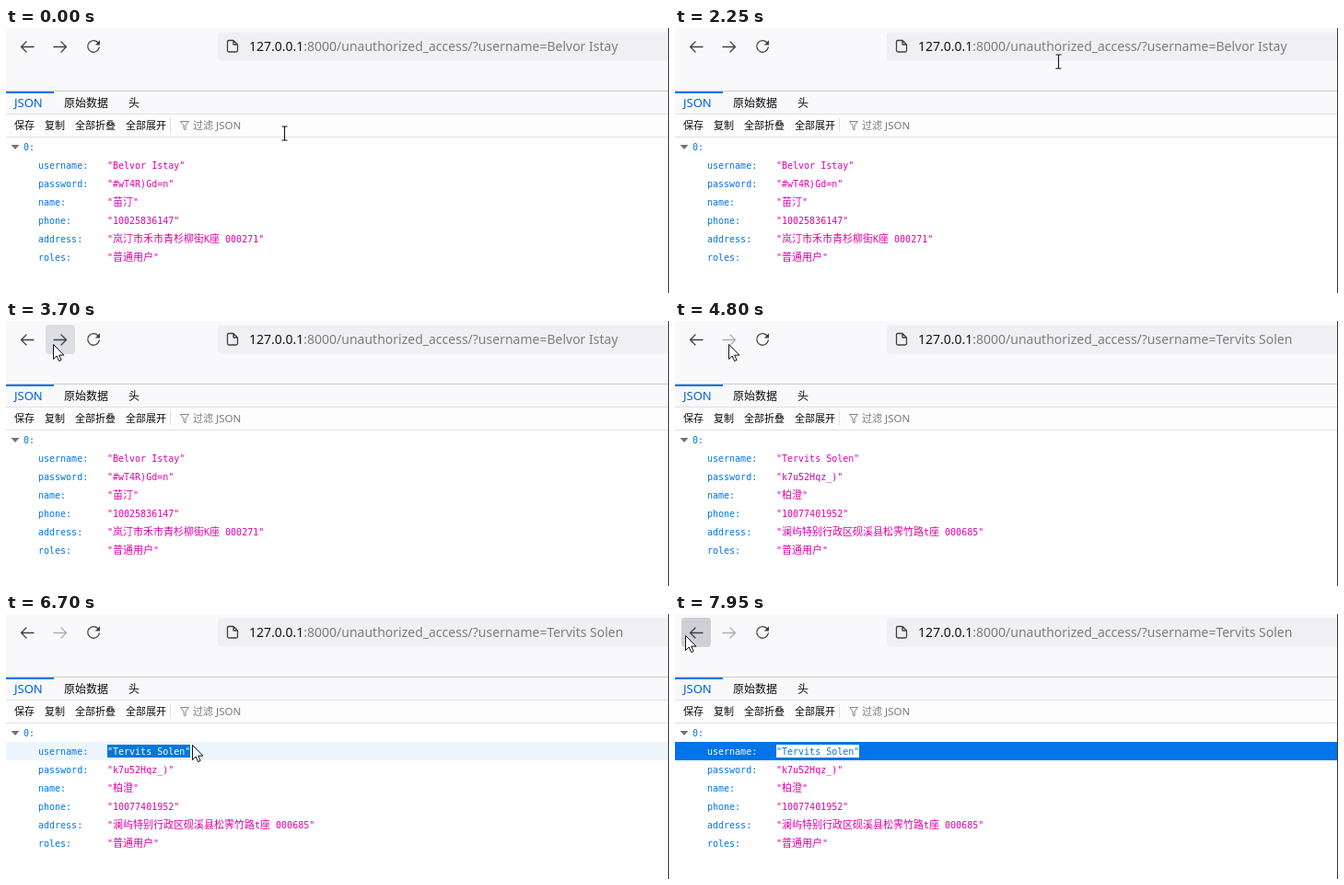
Animation of 720x288 px, one loop 8 s. Source, as an HTML page:

```html
<!DOCTYPE html>
<html lang="zh">
<head>
<meta charset="utf-8">
<title>JSON viewer</title>
<style>
html, body { margin: 0; width: 100%; height: 100%; overflow: hidden; background: #fff; }
svg { display: block; width: 100vw; height: 100vh; }
text { white-space: pre; }
.ui { font-family: "Noto Sans", "Noto Sans CJK SC", sans-serif; }
.url { font-size: 14px; fill: #7c7c82; }
.url .host { fill: #15141a; }
.url.picked, .url.picked .host { fill: #fff; }
.mono { font: 10px "DejaVu Sans Mono", "Noto Sans CJK SC", monospace; fill: #dd00a9; }
.mono .cjk { font-size: 11px; }
.key { fill: #0074e8; }
.tab { font-size: 13px; fill: #0c0c0d; }
.tab .cjk { font-size: 12px; }
.tool { font-size: 11.5px; fill: #0c0c0d; }
.tool .cjk { font-size: 11px; }
.icon { fill: none; stroke: #3f3f46; stroke-width: 1.3; stroke-linecap: round; stroke-linejoin: round; }
.hidden { display: none; }
</style>
</head>
<body>
<svg viewBox="0 0 720 288">
  <defs>
    <clipPath id="dragClip"><rect id="dragArea" x="110" y="142" width="0" height="14"/></clipPath>
  </defs>
  <rect width="720" height="288" fill="#fff"/>
  <rect width="720" height="68" fill="#f9f9fb"/>

  <rect id="backButton" x="7" y="4" width="32" height="32" rx="4"/>
  <rect id="forwardButton" x="43" y="4" width="32" height="32" rx="4"/>
  <path class="icon" d="M30 20.5H16.5M22 15l-5.5 5.5 5.5 5.5"/>
  <path class="icon" id="forwardIcon" d="M52 20.5h13.5M60 15l5.5 5.5-5.5 5.5"/>
  <path class="icon" d="M100.2 16.2A6.3 6.3 0 1 0 101.3 21"/>
  <path d="M102 13.3v5.2h-5.2z" fill="#3f3f46"/>

  <rect id="bar" x="230" y="4.5" width="500" height="31" rx="4" fill="#f0f0f4"/>
  <path class="icon" d="M247 13.5h-5q-1.500 0-1.500 1.500v9.500q0 1.500 1.500 1.500h8q1.500 0 1.500-1.500v-6.500zv4.500h4.500"/>
  <rect id="urlPick" x="264" y="11" width="0" height="19" fill="#0078d7"/>
  <text id="url" class="ui url" x="264" y="25"><tspan class="host">127.0.0.1</tspan><tspan>:8000/unauthorized_access/?username=</tspan><tspan id="user"></tspan></text>

  <g id="page">
    <path d="M0 69h720v49H0z" fill="#f9f9fb"/>
    <path d="M0 94h720v24H0z" fill="#fdfdfe"/>
    <path d="M0 93.500h720M0 118.500h720M178.500 98v15" stroke="#e0e0e2"/>
    <path d="M0 69h52v2H0z" fill="#0a74e6"/>
    <g id="labels" class="ui"></g>
    <path d="M189.500 101.500h9l-3.500 4.500v5l-2-1.500v-3.500z" fill="none" stroke="#85858a"/>
    <rect id="hover" width="720" height="20" fill="#edf6ff"/>
    <rect id="chosen" y="139" width="720" height="20" fill="#0074e8"/>
    <path d="M5.500 127h9L10 132z" fill="#737378"/>
    <rect id="dragBox" x="110" y="142" width="0" height="14"/>
    <g id="rows" class="mono"></g>
    <g clip-path="url(#dragClip)"><text id="picked" class="mono" x="110" y="153"></text></g>
  </g>
  <path d="M0 68.500h720" stroke="#cbcbd0"/>
  <path d="M719.500 0v288" stroke="#3a3a3e"/>

  <path id="beam" d="M-3 -7.500h2.200q.8 0 .8.800q0-.8.800-.8H3M0-7V7M-3 7.500h2.200q.8 0 .8-.8q0 .8.800.8H3" fill="none" stroke="#111" stroke-width="1.100"/>
  <path id="arrow" d="M.5.500v16l3.700-3.500 2.400 5.600 2.500-1.100-2.400-5.400h5.200z" fill="#fff" stroke="#111"/>
</svg>
<script>
const LOOP = 8000, STEP = 50;
const $ = id => document.getElementById(id);
const show = (id, on) => $(id).classList.toggle('hidden', !on);
const set = (id, attrs) => {
  for (const name in attrs) $(id).setAttribute(name, attrs[name]);
};

const rich = s => s.replace(/[\u4e00-\u9fff]+/g, '<tspan class="cjk">$&</tspan>');
const textAt = (x, y, s, cls = '', fill = '') =>
  `<text x="${x}" y="${y}" class="${cls}"${fill && ` fill="${fill}" style="fill:${fill}"`}>${rich(s)}</text>`;

const keys = ['username', 'password', 'name', 'phone', 'address', 'roles'];
const users = [
  ['Belvor Istay', '#wT4R)Gd=n', '苗汀', '10025836147', '岚汀市禾市青杉柳街K座 000271', '普通用户'],
  ['Tervits Solen', 'k7u52Hqz_)', '柏澄', '10077401952', '澜屿特别行政区砚溪县松霁竹路t座 000685', '普通用户']
];

$('labels').innerHTML =
  textAt(9, 86, 'JSON', 'tab', '#0060df') + textAt(63, 86, '原始数据', 'tab') + textAt(133, 86, '头', 'tab') +
  textAt(9, 110, '保存', 'tool') + textAt(42, 110, '复制', 'tool') +
  textAt(75, 110, '全部折叠', 'tool') + textAt(130, 110, '全部展开', 'tool') +
  textAt(203, 110, '过滤 JSON', 'tool', '#7a7a7f');

let urlWidth = 0, current = -1;
function loadUser(index) {
  if (index === current) return;
  current = index;
  $('rows').innerHTML = textAt(19, 133, '0:', 'key') + keys.map((key, i) =>
    textAt(35, 153 + i * 20, key + ':', 'key') +
    textAt(110, 153 + i * 20, `"${users[index][i]}"`)).join('');
  $('picked').textContent = `"${users[index][0]}"`;
}

// Pointer stops: time, x, y
const path = [
  [0, 302, 114], [550, 302, 114], [700, 291, 114], [800, 291, 114],
  [1400, 425, 31], [1550, 423, 36], [1650, 417, 36], [2200, 417, 36], [2250, 416, 36],
  [3050, 24, 24], [3400, 33, 25], [3500, 33, 25], [3700, 51, 25], [3950, 58, 25],
  [5150, 58, 25], [6000, 122, 152], [6100, 113, 146], [6250, 113, 146],
  [6700, 202, 142], [6800, 202, 142], [7050, 204, 148], [7150, 204, 148],
  [7650, 18, 22], [7750, 18, 22], [7950, 11, 23], [LOOP, 11, 23]
];
function pointer(t) {
  const i = path.findIndex(stop => stop[0] > t);
  const [t0, x0, y0] = path[i - 1], [t1, x1, y1] = path[i];
  const p = (t - t0) / (t1 - t0), e = p * p * (3 - 2 * p);
  return [Math.round(x0 + (x1 - x0) * e), Math.round(y0 + (y1 - y0) * e)];
}

const within = (t, a, b) => t >= a && t < b;

function render(t) {
  const [x, y] = pointer(t);
  const isBeam = (x > 230 && y < 37) || (x > 183 && y > 94 && y < 119);
  const over = left => within(x, left, left + 32) && within(y, 4, 36);
  const moved = t >= 4550;

  $('user').textContent = users[+moved][0];
  loadUser(t >= 4700 ? 1 : 0);
  show('page', !within(t, 1750, 1900) && !within(t, 4600, 4700));

  const focused = within(t, 1450, 1700);
  set('bar', focused
    ? { fill: '#fff', stroke: '#5a9fea', 'stroke-width': 2 }
    : { fill: '#f0f0f4', stroke: 'none' });
  $('url').classList.toggle('picked', focused);
  if (focused) urlWidth = $('url').getComputedTextLength();
  set('urlPick', { width: focused ? urlWidth + 1 : 0 });

  const face = (hovered, pressed) => pressed ? '#cfcfd8' : hovered ? '#dddde4' : 'none';
  set('backButton', { fill: face(over(7), t >= 7850) });
  set('forwardButton', { fill: face(over(43) && !moved, within(t, 4200, 4300)) });
  set('forwardIcon', { opacity: moved ? 0.4 : 1 });

  const row = Math.floor((y - 119) / 20);
  show('hover', row >= 0);
  set('hover', { y: 119 + row * 20 });

  const chosen = t >= 6850;
  const dragged = t < 6300 ? 0 : t >= 6700 ? 90 : Math.max(0, Math.min(90, x - 110));
  show('chosen', chosen);
  set('dragBox', { width: dragged, fill: chosen ? '#fff' : '#0078d7' });
  set('dragArea', { width: dragged });
  $('picked').style.fill = chosen ? '#0074e8' : '#fff';
  const [, userKey, userValue] = $('rows').children;
  userKey.style.fill = chosen ? '#fff' : '';
  userValue.style.visibility = dragged >= 90 ? 'hidden' : '';

  show('beam', isBeam);
  show('arrow', !isBeam);
  set('beam', { transform: `translate(${x + 0.5} ${y + 0.5})` });
  set('arrow', { transform: `translate(${x} ${y})` });
}

const start = performance.now();
function tick(now) {
  const t = Math.max(0, now - start) % LOOP;
  render(Math.floor(t / STEP) * STEP);
  requestAnimationFrame(tick);
}
render(0);
requestAnimationFrame(tick);
</script>
</body>
</html>
```
